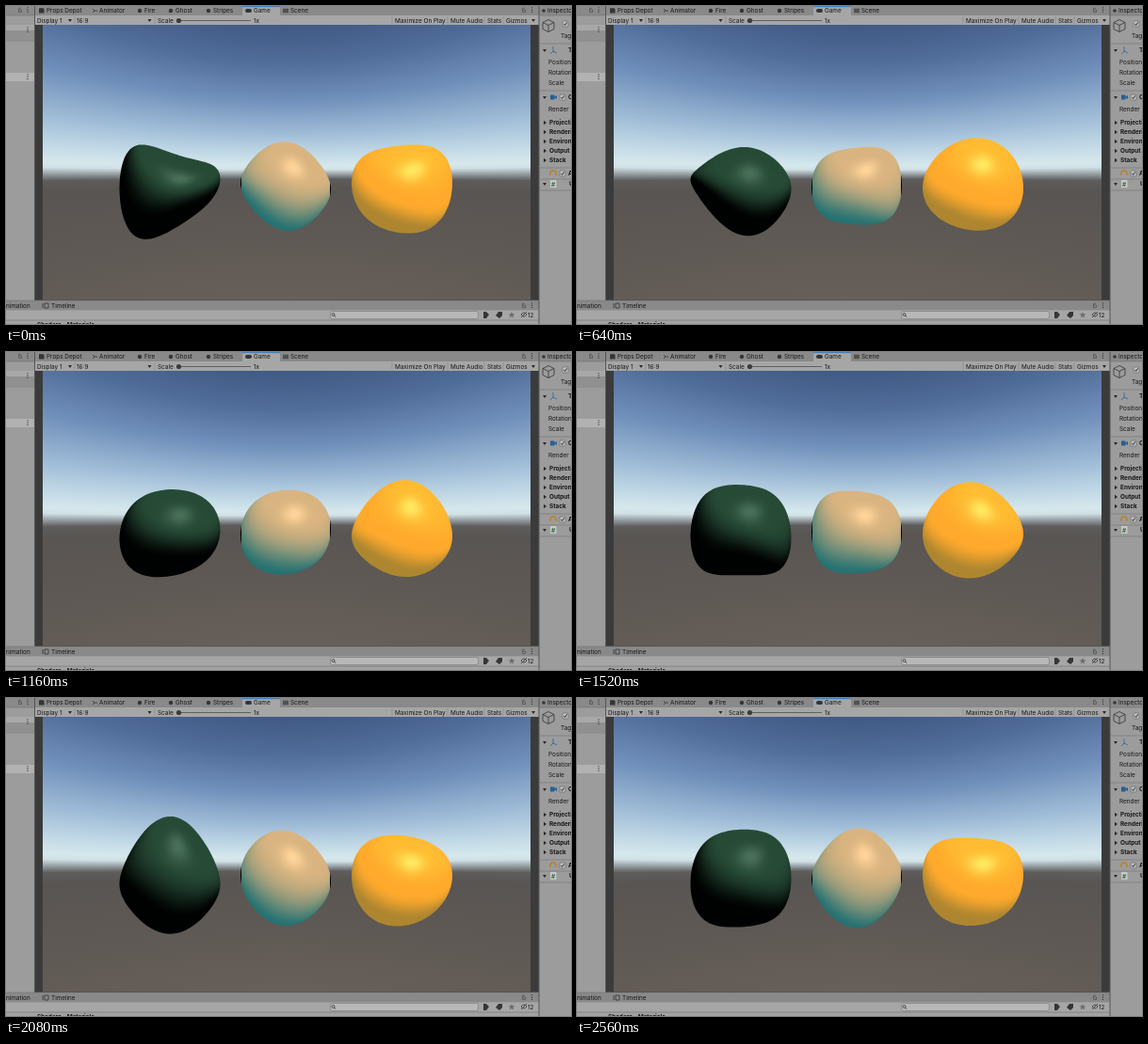
Recreate the animation shown at these times as an HTML page with a canvas. Size 600 by 338 pixels, loop 2600 ms.

```html
<!DOCTYPE html>
<html lang="en">
<head>
<meta charset="utf-8">
<title>Wobbling blobs</title>
<style>
html, body { margin: 0; width: 100%; height: 100%; overflow: hidden; background: #9c9c9c; }
svg, canvas { position: absolute; left: 0; top: 0; width: 600px; height: 338px; display: block; }
text { font: 6.4px Inter, Roboto, sans-serif; fill: #161616; }
.b { font-weight: 700; }
</style>
</head>
<body>
<svg viewBox="0 0 600 338">
  <rect width="600" height="338" fill="#9c9c9c"/>
  <rect width="600" height="10" fill="#898989"/>
  <rect y="20" width="30" height="6" fill="#a8a8a8"/>
  <rect y="26" width="30" height="12" fill="#909090"/>
  <rect y="71" width="30" height="9" fill="#b2b2b2"/>
  <rect x="251" width="40" height="10" fill="#a6a6a6"/>
  <rect x="251" width="40" height="1.2" fill="#4480bb"/>
  <rect x="31" y="10" width="535" height="10" fill="#a6a6a6"/>
  <rect x="31" y="20" width="535" height="293" fill="#3b3b3b"/>
  <rect y="313" width="566" height="10.5" fill="#898989"/>
  <rect y="323.5" width="566" height="10.5" fill="#a6a6a6"/>
  <rect y="334" width="566" height="4" fill="#a2a2a2"/>
  <rect x="344.5" y="324.5" width="157" height="8" rx="2" fill="#b8b8b8" stroke="#777" stroke-width=".6"/>
  <path d="M30.5 0V313M566 0V338" stroke="#555"/>
  <path d="M0 10H30M566 10H600M0 313H566M0 334H566M566 40H600M566 90H600M566 172H600M566 184H600M566 196H600" stroke="#777" stroke-width=".7"/>
  <path d="M73 11V19M158 11V19M410 11V19M469 11V19M508 11V19M528 11V19" stroke="#898989" stroke-width=".6"/>
  <path d="M183 15.5H260" stroke="#606060"/>
  <circle cx="183.5" cy="15.5" r="2.6" fill="#3c3c3c"/>
  <g id="labels"></g>
  <g id="icons" fill="#292929"></g>
  <g fill="none" stroke="#333" stroke-width=".8">
    <path d="M92 3l2 2-2 2M94 5h3M295 2.5v5M297 2.5v5M299 2.5v5M294 4h6M294 6h6M39 316v5M41 316h4v5h-4z"/>
    <path d="M570 17.500l6-3 6 3v7l-6 3-6-3zM570 17.500l6 3 6-3M576 20.500v7"/>
    <path d="M581 43v6M578 51l3-3 4 2" stroke="#2767a0"/>
    <path d="M578 180v-2a3 3 0 0 1 6 0v2" stroke="#bc821e" stroke-width="1.4"/>
    <circle cx="347.5" cy="328" r="1.5"/>
    <path d="M348.500 329l1.500 1.700M547 328q3-4 6 0q-3 4-6 0M547 331l6-6M35.500 3.500v-1h4v1"/>
  </g>
  <g fill="#353535">
    <rect x="35" y="3" width="5.5" height="4.5"/>
    <circle cx="142" cy="5" r="2.2"/><circle cx="175" cy="5" r="2.2"/><circle cx="215" cy="5" r="2.2"/>
    <circle cx="571" cy="5" r="1.8"/>
    <rect x="254" y="3" width="7" height="4" rx="2"/>
    <path d="M507 325h3l3 3-3 4h-3zM520 329l3-4h4v4l-3 3z"/>
    <path d="M537 325l1 2.300 2.500.2-2 1.500.7 2.500-2.200-1.400-2.200 1.400.7-2.500-2-1.500 2.500-.2z" fill="#6c6c6c"/>
  </g>
  <path d="M578 94.500h4.500v2l2.500-1.500v4l-2.500-1.500v2h-4.500z" fill="#285f92"/>
  <rect x="578" y="185" width="6.5" height="8" fill="#c7c7c7"/>
  <text x="579" y="191.5" class="b" style="fill:#326b3e">#</text>
</svg>
<canvas id="sky" width="600" height="338"></canvas>
<canvas id="view" width="600" height="338"></canvas>
<script>
const context = id => document.getElementById(id).getContext("2d");

// Editor labels, icons
const label = (x, y, s, cls = "") => `<text x="${x}" y="${y}" class="${cls}">${s}</text>`;
const row = (y, items) => items.map(([x, s]) => label(x, y, s)).join("");
const stack = (x, y, step, names, cls) => names.map((s, i) => label(x, y + i * step, s, cls)).join("");
document.getElementById("labels").innerHTML =
  row(7.3, [[43, "Props Depot"], [99, "Animator"], [147, "Fire"], [180, "Ghost"], [220, "Stripes"],
    [263, "Game"], [302, "Scene"], [575, "Inspector"]]) +
  row(17.5, [[33, "Display 1"], [75, "16:9"], [161, "Scale"], [263, "1x"], [413, "Maximize On Play"],
    [472, "Mute Audio"], [511, "Stats"], [531, "Gizmos"]]) +
  label(589, 34.2, "Tag") + label(576, 112.2, "Render") +
  stack(576, 62.2, 11, ["Position", "Rotation", "Scale"]) +
  stack(577, 126.2, 10, ["Projection", "Rendering", "Environment", "Output", "Stack"], "b") +
  label(597, 49.3, "Transform", "b") + label(597, 99.3, "Camera", "b") +
  label(597, 180.3, "Audio", "b") + label(598, 191.3, "Url", "b") +
  label(-4.5, 321.2, "Animation") + label(48, 321.2, "Timeline") +
  label(554, 331, "12") + label(33, 341, "Shaders › Materials", "b");

const each = (spots, draw) => spots.map(([x, y]) => draw(x, y)).join("");
document.getElementById("icons").innerHTML =
  each([[68, 15], [152.5, 15], [560, 15], [572, 47], [572, 97], [572, 189]],
    (x, y) => `<path d="M${x - 2} ${y - 1}h4l-2 3z"/>`) +
  [0, 1, 2, 3, 4].map(i => `<path d="M571 ${121.8 + i * 10}v4.400l3-2.200z"/>`).join("") +
  each([[23, 4], [23, 25], [23, 75], [558.5, 4], [558.5, 318]],
    (x, y) => `<path d="M${x} ${y - 2.8}v6" stroke="#333" stroke-width="1.1" stroke-dasharray="1.1 1.3"/>`) +
  each([[15, 4], [550, 4], [550, 318]],
    (x, y) => `<path d="M${x - 1.5} ${y}h3v2.500h-3zv-1a1 1 0 0 1 2 0" fill="none" stroke="#444" stroke-width=".6"/>`) +
  each([[594, 19], [591, 97], [591, 178]],
    (x, y) => `<rect x="${x - 3}" y="${y - 3}" width="6" height="6" rx="1" fill="#bcbcbc" stroke="#555" stroke-width=".5"/>
      <path d="M${x - 1.7} ${y}l1.300 1.500 2.200-3.200" fill="none" stroke="#222" stroke-width=".9"/>`);

// Sky: lines of equal elevation rise towards the sides of a wide camera view.
function drawSky() {
  const g = context("sky"), horizon = 180, up = 160, down = 132.5, focal = 253;
  const fill = g.createLinearGradient(0, -up, 0, down);
  const stop = (y, color) => fill.addColorStop((y + up) / (up + down), color);
  stop(-160, "#405a85");
  stop(-120, "#506c98");
  stop(-80, "#708fba");
  stop(-45, "#9ebbd6");
  stop(-25, "#bed6e4");
  stop(-10, "#d6e8ec");
  stop(-6, "#d0e0e4");
  stop(-1, "#969ea2");
  stop(4, "#5e5d5c");
  stop(12, "#595552");
  stop(132, "#675f59");
  g.fillStyle = fill;
  for (let x = 39; x < 557; x++) {
    const k = Math.hypot(1, (x - 298) / focal);
    g.setTransform(1, 0, 0, k, x, horizon);
    g.fillRect(0, -up / k, 1, (up + down) / k);
  }
}

const clamp = (v, a, b) => Math.min(b, Math.max(a, v));
const smooth = (a, b, v) => { v = clamp((v - a) / (b - a), 0, 1); return v * v * (3 - 2 * v); };
const mix = (a, b, k) => a.map((c, i) => c + (b[i] - c) * k);
const glow = (c, add, k) => c.map((v, i) => v + add[i] * k);

// Waves round each outline: [lobes, angle, height, rate, phase, fade].
// Each shade maps diffuse light d and highlight s to a colour.
const Q = Math.PI / 2;
const BLOBS = [
  {
    cx: 174, cy: 193, rx: 53.5, ry: 50,
    waves: [[1, Q, 7.5, 5, -1], [1, 0, 5, 13.8, 0], [2, 0, -5, 5, -.5], [2, Q, -12, 12.6, 0, 4], [3, Q, -5, 12.6, -.63]],
    shade: (d, s) => glow(mix([0, 2, 1], [38, 74, 54], smooth(-.05, .75, d)), [36, 37, 35], s)
  },
  {
    cx: 297, cy: 191.5, rx: 48, ry: 46.7,
    waves: [[1, 0, -3.5, 8.6, -.2], [1, Q, 3, 2.9, 0], [2, Q, 2, 6.6, -1.3], [3, Q, 3.5, 38, 0]],
    shade: (d, s) => glow(mix([38, 114, 114], [218, 180, 128], smooth(-.65, .85, d)), [37, 32, 26], s)
  },
  {
    cx: 420.5, cy: 191.5, rx: 53.5, ry: 49,
    waves: [[2, 0, 4, 6, -2.5], [2, Q, 2.5, 27.6, 0], [3, Q, 2.4, 6.3, -3.1]],
    shade: (d, s) => glow(glow(mix([174, 134, 48], [255, 170, 44], smooth(-.38, .32, d)),
      [0, 18, 6], smooth(.4, 1, d)), [0, 46, 46], s)
  }
];
const LIGHT = [.32, .77, .56], HALF = [.18, .44, .88];
const dot = (a, x, y, z) => a[0] * x + a[1] * y + a[2] * z;

const LOOP = 2600, STEP = 40, TOP = 122, W = 114, H = 148;
const ctx = context("view"), patch = document.createElement("canvas");
patch.width = W;
patch.height = H;
const pctx = patch.getContext("2d"), img = pctx.createImageData(W, H);

// Angle 0 is the left end, a quarter turn is the top.
function edge({ cy, ry, waves }, angle, t) {
  return waves.reduce((y, [n, side, height, rate, phase, fade = 0]) =>
    y + height * Math.cos(n * angle - side) * Math.cos(rate * t + phase) * Math.exp(-fade * t),
    cy - ry * Math.sin(angle));
}

function column(blob, u, t) {
  const angle = Math.acos(-u);
  const top = edge(blob, angle, t), low = edge(blob, 2 * Math.PI - angle, t);
  return { mid: (top + low) / 2, half: Math.max(.6, (low - top) / 2) };
}

function drawBlob(blob, t) {
  const { cx, rx, shade } = blob, left = Math.floor(cx - rx) - 2, du = 1 / rx;
  for (let i = 0; i < W; i++) {
    const u = clamp((left + i + .5 - cx) / rx, -.98, .98), w = Math.sqrt(1 - u * u);
    const c = column(blob, u, t), a = column(blob, u - du, t), b = column(blob, u + du, t);
    const lean = (b.mid - a.mid) / 2;
    const swell = (b.half - a.half) / 2 + u * c.half / (rx * w * w);
    for (let j = 0; j < H; j++) {
      const v = clamp((TOP + j + .5 - c.mid) / c.half, -1, 1), z = Math.sqrt(1 - v * v) * w;
      // Sphere normal, half bent by the slope of the waves
      const y = -w * w * rx * v / c.half, x = u + .5 * y * (lean + v * swell);
      const len = Math.hypot(x, y, z);
      const s = Math.max(0, dot(HALF, x, y, z) / len) ** 30;
      img.data.set([...shade(dot(LIGHT, x, y, z) / len, s), 255], (j * W + i) * 4);
    }
  }
  pctx.putImageData(img, 0, 0);
  ctx.save();
  ctx.beginPath();
  for (let n = 0; n < 96; n++) {
    const angle = n / 48 * Math.PI;
    ctx.lineTo(cx - rx * Math.cos(angle), edge(blob, angle, t));
  }
  ctx.clip();
  ctx.drawImage(patch, left, TOP);
  ctx.restore();
}

let shown = -1;
function frame(now) {
  const t = Math.floor(now % LOOP / STEP) * STEP;
  if (t !== shown) {
    shown = t;
    ctx.clearRect(0, 0, 600, 338);
    BLOBS.forEach(blob => drawBlob(blob, t / LOOP));
  }
  requestAnimationFrame(frame);
}
drawSky();
frame(0);
</script>
</body>
</html>
```
